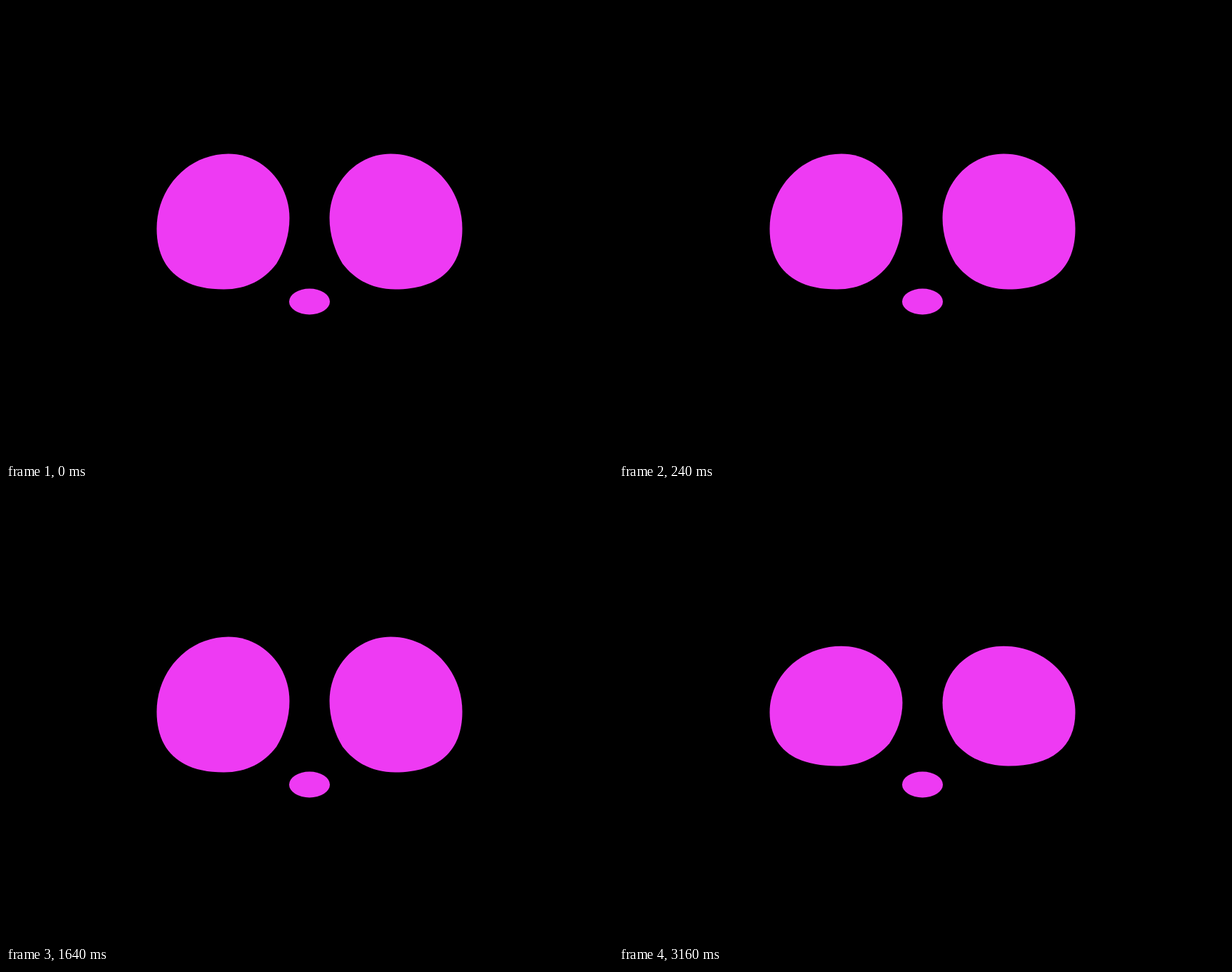
Recreate the animation shown at these times as an HTML page. Size 864 by 648 pixels, loop 3200 ms.

```html
<!DOCTYPE html>
<html lang="en">
<head>
<meta charset="utf-8">
<title>Blinking eyes</title>
<style>
  html, body { margin: 0; width: 100%; height: 100%; overflow: hidden; background: #000; }
  svg { display: block; width: 100%; height: 100%; fill: #ee3af3; }
</style>
</head>
<body>
<svg viewBox="0 0 864 648">
  <g id="eyes">
    <path id="eye" d="M316.5 210.5 C364.5 210.5 403.5 251.5 403.5 302 C403.5 326 396 349 385 367
      C367 390 343 403.5 310 403.5 C248 403.5 214.5 373 214.5 317 C214.5 258.2 260.2 210.5 316.5 210.5Z"/>
    <use href="#eye" transform="matrix(-1 0 0 1 864 0)"/>
  </g>
  <ellipse cx="432" cy="421" rx="29" ry="18.5"/>
</svg>
<script>
  const LOOP = 3200, STEP = 40;
  const BLINK_STARTS = [0, 1400, 2940], BLINK_LENGTH = 235;
  const CLOSED_SCALE = 0.1, PIVOT_Y = 324.8;
  const eyes = document.getElementById('eyes');

  // Linear close and reopen; 1 is fully open.
  function openness(time) {
    const start = BLINK_STARTS.find(s => time >= s && time < s + BLINK_LENGTH);
    if (start === undefined) return 1;
    const distance = Math.abs((time - start) / BLINK_LENGTH * 2 - 1);
    return CLOSED_SCALE + (1 - CLOSED_SCALE) * distance;
  }

  const startTime = performance.now();
  function draw() {
    const elapsed = (performance.now() - startTime) % LOOP;
    const scale = openness(Math.floor(elapsed / STEP) * STEP);
    eyes.setAttribute('transform', `matrix(1 0 0 ${scale} 0 ${PIVOT_Y * (1 - scale)})`);
    requestAnimationFrame(draw);
  }
  draw();
</script>
</body>
</html>
```
